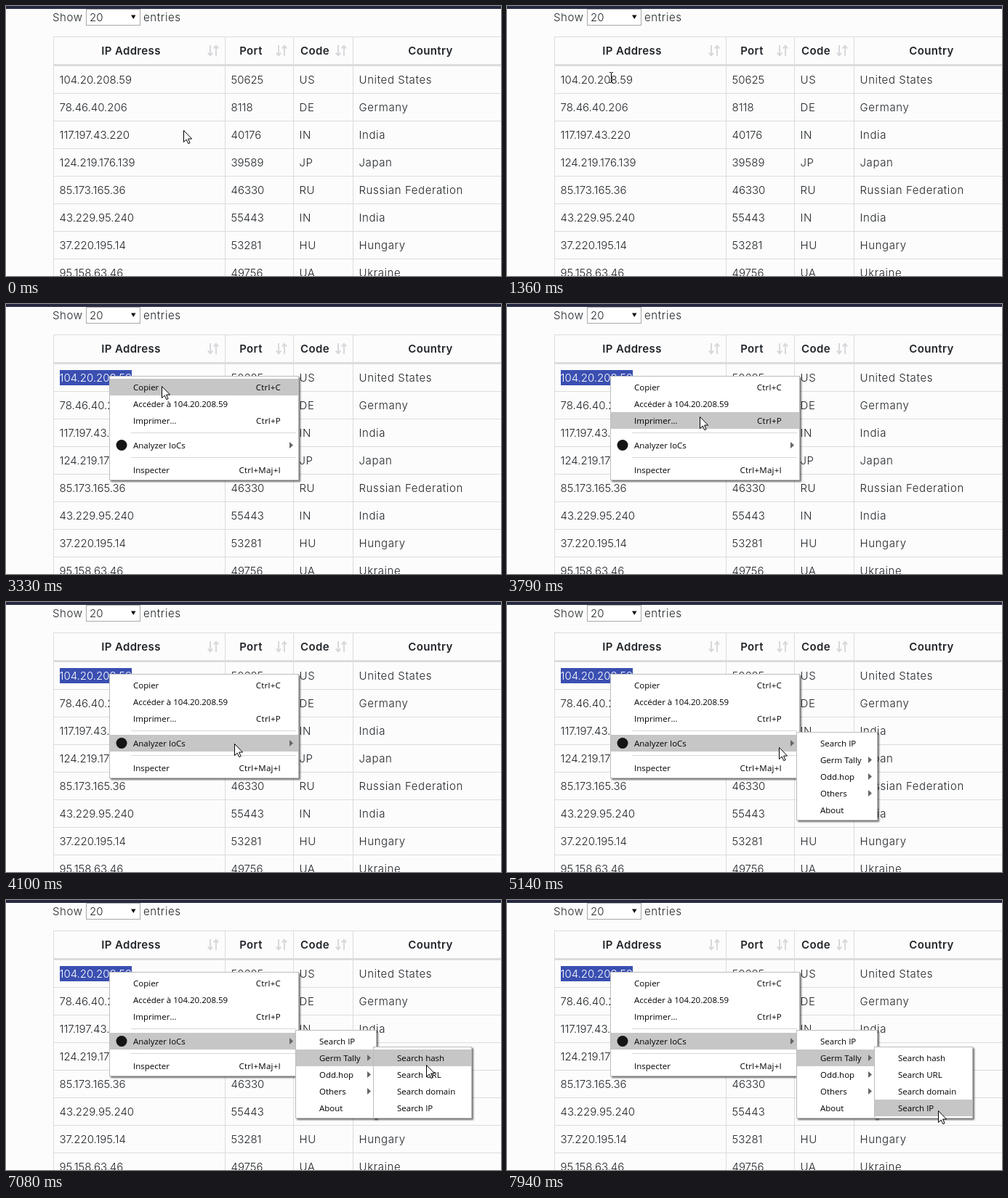
An HTML page that plays this animation: 681x372 px, repeating every 8 s.

```html
<!DOCTYPE html>
<html lang="en">
<head>
<meta charset="utf-8">
<title>IP lookup menu</title>
<style>
  html, body { margin: 0; width: 100%; height: 100%; overflow: hidden; background: #fcfcfc; }
  svg { display: block; width: 100%; height: 100%; }
  text { white-space: pre; }
  .cell, .head { font-family: Inter, "Open Sans", sans-serif; font-size: 15px; fill: #212529; }
  .cell { font-weight: 300; letter-spacing: .6px; }
  .num { letter-spacing: -.02px; }
  .head { font-weight: 600; letter-spacing: .35px; text-anchor: middle; }
  .item { font: 11.5px "Open Sans", "Noto Sans", sans-serif; fill: #000; }
  .key { text-anchor: end; letter-spacing: .25px; }
  .panel { fill: #fff; stroke: #bcbcbc; filter: drop-shadow(2px 2px 1.2px rgba(0, 0, 0, .55)); }
</style>
</head>
<body>
<svg id="stage" viewBox="0 0 681 372"></svg>
<script>
const LOOP = 8000;
const FRAME = 150;
const ITEM = 23;
const stage = document.getElementById('stage');

function add(parent, tag, attrs, text) {
  const el = document.createElementNS('http://www.w3.org/2000/svg', tag);
  for (const k in attrs) el.setAttribute(k, attrs[k]);
  if (text !== undefined) el.textContent = text;
  return parent.appendChild(el);
}
const rect = (p, x, y, width, height, fill) => add(p, 'rect', { x, y, width, height, fill });
const label = (p, cls, x, y, text) => add(p, 'text', { class: cls, x, y }, text);
const path = (p, d, attrs) => add(p, 'path', { d, ...attrs });
const show = (el, on) => { el.style.display = on ? '' : 'none'; };

// Page
const page = add(stage, 'g');
rect(page, 0, 0, 681, 372, '#fcfcfc');
rect(page, 0, 0, 681, 4, '#252a41');
label(page, 'cell', 64, 21, 'Show');
add(page, 'rect', { x: 110.5, y: 4.5, width: 74, height: 22, fill: '#fff', stroke: '#a9a9a9' });
label(page, 'cell num', 115, 21, '20');
path(page, 'M172 12.5h6.5l-3.25 5.5z', { fill: '#111' });
label(page, 'cell', 189, 21, 'entries');

// Table
const LINE = '#dcdcdc';
const columns = [
  { left: 65, title: 'IP Address', mid: 172, cls: 'cell num' },
  { left: 301, title: 'Port', mid: 337, cls: 'cell num' },
  { left: 395, title: 'Code', mid: 425, cls: 'cell' },
  { left: 477, title: 'Country', mid: 584, cls: 'cell' }
];
const rows = [
  '104.20.208.59|50625|US|United States',
  '78.46.40.206|8118|DE|Germany',
  '117.197.43.220|40176|IN|India',
  '124.219.176.139|39589|JP|Japan',
  '85.173.165.36|46330|RU|Russian Federation',
  '43.229.95.240|55443|IN|India',
  '37.220.195.14|53281|HU|Hungary',
  '95.158.63.46|49756|UA|Ukraine'
].map(row => row.split('|'));

rect(page, 65, 42, 616, 1, LINE);
rect(page, 65, 80, 616, 3, LINE);
rows.forEach((row, i) => {
  rect(page, 65, 120 + i * 38, 616, 1, LINE);
  columns.forEach((c, k) => label(page, c.cls, c.left + 8.5, 107 + i * 38, row[k]));
});
columns.forEach((c, k) => {
  rect(page, c.left, 42, 1, 330, LINE);
  label(page, 'head', c.mid, 67, c.title);
  if (k) {
    path(page, 'M4 0V14M.8 10.5L4 14.2L7.2 10.5M12 15V1M8.8 4.5L12 .8L15.2 4.5', {
      transform: `translate(${c.left - 24} 54)`, fill: 'none', stroke: '#d8d9dc', 'stroke-width': 2
    });
  }
});

const selection = add(stage, 'g');
rect(selection, 74, 91, 99, 21, '#3a4fb1');
label(selection, 'cell num', 73.5, 107, rows[0][0]).style.fill = '#fff';

// Menus stack their items downwards; an empty entry is a separator
function makeMenu(from, x, y, width, indent, entries) {
  const g = add(stage, 'g');
  const panel = add(g, 'rect', { class: 'panel', x: x + .5, y: y + .5, width: width - 1 });
  const right = x + width;
  const items = [];
  let top = y + 4;
  for (const [text, note] of entries) {
    if (!text) {
      rect(g, x + 30, top + 5, width - 34, 1, '#d7d7d7');
      top += 11;
      continue;
    }
    const bar = rect(g, x + 1, top, width - 2, ITEM, '#c6c6c6');
    label(g, 'item', x + indent, top + 16, text);
    if (note === '>') path(g, `M${right - 13} ${top + 7}l5 4.5l-5 4.5z`, { fill: '#666' });
    else if (note) label(g, 'item key', right - 25, top + 16, note);
    items.push({ top, bar, note });
    top += ITEM;
  }
  panel.setAttribute('height', top + 2 - y);
  return { g, from, x, right, items };
}

const menus = [
  makeMenu(2880, 142, 99, 261, 33, [
    ['Copier', 'Ctrl+C'], ['Accéder à 104.20.208.59'], ['Imprimer...', 'Ctrl+P'], [],
    ['Analyzer IoCs', '>'], [],
    ['Inspecter', 'Ctrl+Maj+I']
  ]),
  makeMenu(4400, 398, 179, 112, 33, [
    ['Search IP'], ['Germ Tally', '>'], ['Odd.hop', '>'], ['Others', '>'], ['About']
  ]),
  makeMenu(6300, 505, 202, 136, 33, [
    ['Search hash'], ['Search URL'], ['Search domain'], ['Search IP']
  ])
];
add(menus[0].g, 'circle', { cx: 159, cy: 194.5, r: 7.5, fill: '#151515' });

// Pointers
const arrow = path(stage, 'M.5 .5V16.5L4.2 13L6.8 18.6L9.1 17.6L6.6 12H11.6Z',
  { fill: '#fff', stroke: '#000', 'stroke-linejoin': 'round' });
const beam = path(stage, 'M-2 -6.5H0M1 -6.5H3M.5 -6V7M-2 7.5H0M1 7.5H3',
  { fill: 'none', stroke: '#000' });

// Pointer moves: first step, last step, where it ends
const moves = [
  [620, 1360, 143, 98],
  [3180, 3330, 214, 113],
  [3490, 4100, 314, 195],
  [4990, 5850, 473, 207],
  [6000, 6150, 472, 210],
  [6770, 7080, 578, 227],
  [7230, 7940, 593, 290]
];

// Eased travel, advanced in whole frames
function pointerAt(t) {
  let x = 244, y = 171;
  for (const [from, to, endX, endY] of moves) {
    if (t < from) break;
    const gaps = Math.round((to - from) / FRAME);
    const step = Math.floor((t - from) / (to - from) * gaps + .02) + 1;
    const p = 1 - (1 - Math.min(1, step / (gaps + 1))) ** 1.4;
    x += (endX - x) * p;
    y += (endY - y) * p;
  }
  return [Math.round(x), Math.round(y)];
}

function draw(t) {
  const [x, y] = pointerAt(t);
  const overText = t < 2730 && x > 73 && x < 173 && y > 91 && y < 114;
  show(arrow, !overText);
  show(beam, overText);
  for (const el of [arrow, beam]) el.setAttribute('transform', `translate(${x} ${y})`);
  show(selection, t >= 1660);

  const open = menus.filter(m => t >= m.from);
  const hovered = open.findLastIndex(m => x > m.x && x < m.right);
  menus.forEach((m, i) => {
    show(m.g, t >= m.from);
    const held = i + 1 < open.length && hovered !== i
      ? m.items.find(item => item.note === '>') : null;
    for (const item of m.items) {
      const under = hovered === i && y >= item.top && y < item.top + ITEM;
      show(item.bar, under || item === held);
    }
  });
}

const start = performance.now();
function tick() {
  draw((performance.now() - start) % LOOP);
  requestAnimationFrame(tick);
}
tick();
</script>
</body>
</html>
```
